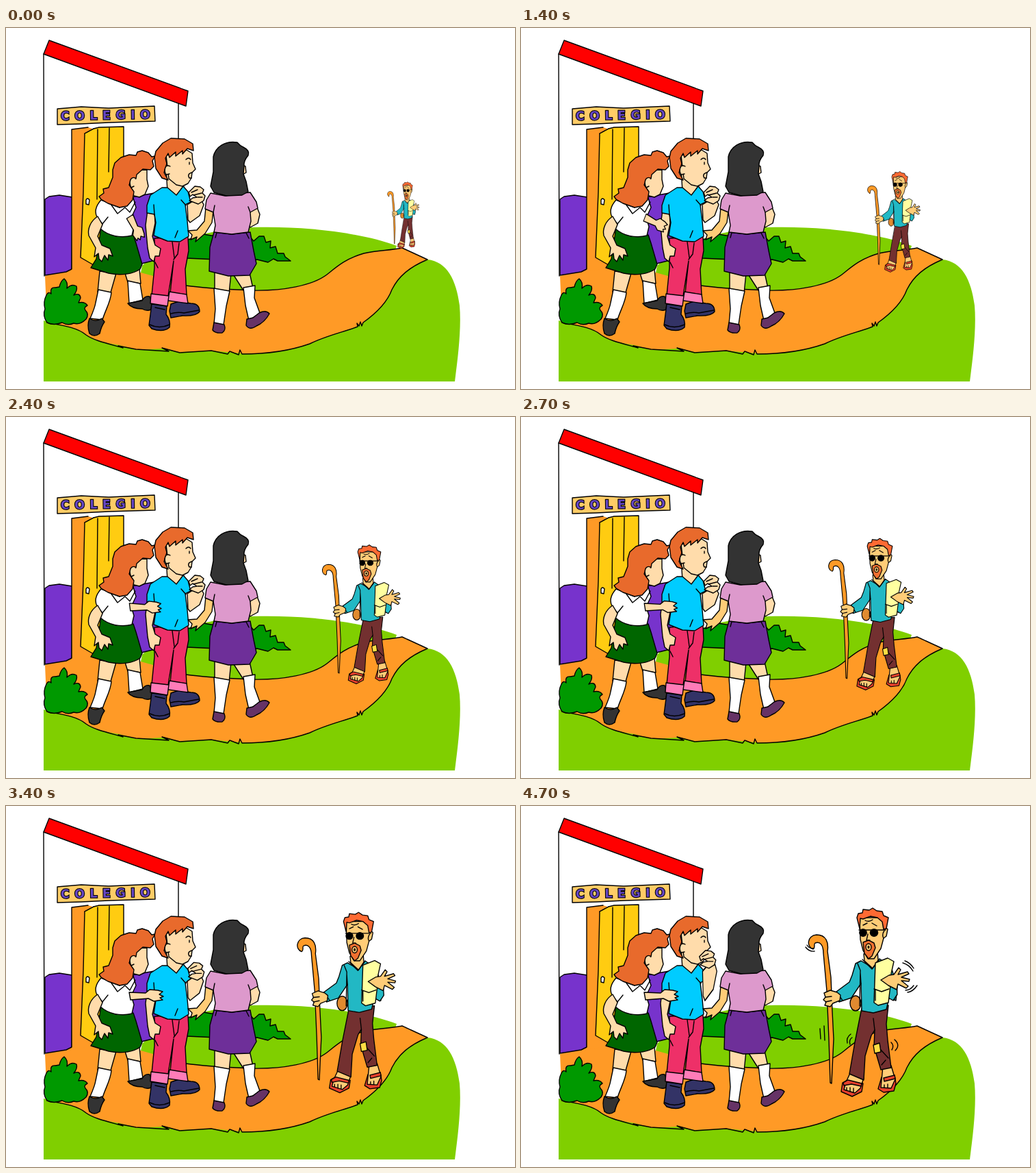
An HTML page for the animation above (4.8 s loop, 744 by 527 pixels).

```html
<!DOCTYPE html>
<html lang="es">
<head>
<meta charset="utf-8">
<title>Colegio</title>
<style>
@property --x { syntax: "<length>"; inherits: false; initial-value: 0px; }
@property --y { syntax: "<length>"; inherits: false; initial-value: 0px; }
@property --sx { syntax: "<number>"; inherits: false; initial-value: 1; }
@property --sy { syntax: "<number>"; inherits: false; initial-value: 1; }
@property --turn { syntax: "<angle>"; inherits: false; initial-value: 0deg; }
@property --lean { syntax: "<number>"; inherits: false; initial-value: 0; }

html, body { margin: 0; width: 100%; height: 100%; overflow: hidden; background: #fff; }
svg { display: block; width: 744px; height: 527px; }
path, ellipse { stroke: #000; stroke-width: 1.4; stroke-linejoin: round; stroke-linecap: round; }
.flat { stroke: none; }
.line { fill: none; }
.skin { fill: #ffdcab; }
.tan { fill: #ffcc77; }
.white { fill: #fff; }
.orange { fill: #ff9a26; }
.yellow { fill: #ffcc11; }
.violet { fill: #7733cc; }
.grass { fill: #80cf00; }
.bush { fill: #009900; }
.red { fill: #e8402c; }
.ginger { fill: #e86a2c; }
.teal { fill: #22b8c4; }
.brown { fill: #733030; }
text { font: bold 17.5px "DejaVu Sans", sans-serif; letter-spacing: 7.4px; fill: #6647c4; stroke: #000; stroke-width: 2.2; paint-order: stroke; }

/* Every 600 ms span is shown as six held poses. */
.man, .reach, .hand, .forearm {
  transform: translate(var(--x), var(--y)) rotate(var(--turn)) scale(var(--sx), var(--sy));
  animation: 4.8s steps(6, end) infinite;
}
.man { animation-name: walk; transform-origin: 514px 424px; }
.reach { animation-name: reach; transform-origin: 183px 276px; }
.hand { animation-name: hand; }
.forearm { animation-name: forearm; transform-origin: 268px 284px; }
.lean {
  transform: translate(calc(var(--lean) * var(--dx)), calc(var(--lean) * 2px));
  animation: lean 4.8s steps(6, end) infinite;
}
.shake { animation: shake 4.8s step-end infinite; }

@keyframes walk {
  0% { --x: 73px; --y: -102px; --sx: .315; --sy: .354; }
  12.5% { --x: 59px; --y: -92px; --sx: .355; --sy: .406; }
  25% { --x: 44px; --y: -76px; --sx: .45; --sy: .489; }
  37.5% { --x: 31px; --y: -53px; --sx: .61; --sy: .616; }
  50% { --x: 17px; --y: -36px; --sx: .732; --sy: .732; }
  62.5% { --x: 4px; --y: -18px; --sx: .866; --sy: .866; }
  75%, 100% { --x: 0px; --y: 0px; --sx: 1; --sy: 1; }
}
@keyframes lean {
  0%, 12.5%, 75%, 100% { --lean: 0; }
  37.5%, 62.5% { --lean: 1; }
}
@keyframes reach {
  0% { --turn: 65deg; --sx: .76; }
  12.5% { --turn: 55deg; --sx: .66; }
  25% { --turn: 38deg; --sx: .68; }
  37.5% { --turn: 10deg; --sx: .78; }
  50% { --turn: 2deg; --sx: .94; }
  62.5%, 100% { --turn: 0deg; --sx: 1; }
}
@keyframes hand {
  0%, 62.5% { --x: 0px; --y: 0px; }
  75% { --x: -2px; --y: -4px; }
  87.5% { --x: -5px; --y: -11px; }
  100% { --x: -6.5px; --y: -22px; }
}
@keyframes forearm {
  0%, 62.5% { --sx: 1; --sy: 1; }
  75% { --sx: .97; --sy: 1.13; }
  87.5% { --sx: .92; --sy: 1.36; }
  100% { --sx: .86; --sy: 1.7; }
}
@keyframes shake {
  0% { opacity: 0; }
  75%, 100% { opacity: 1; }
}
</style>
</head>
<body>
<svg viewBox="0 0 744 527">
  <!-- ground -->
  <path class="grass flat" d="M196 362L199 347C228 318 280 298 340 292C420 287 515 297 571 318L560 350L430 400L200 390Z"/>
  <path class="grass flat" d="M55 427L110 440L300 460L500 400L560 350L616 338C645 341 658 368 663 405C666 440 660 485 656 516H55Z"/>
  <path class="bush" d="M262 310L274 307L283 300L300 303L355 303L362 311L370 304L377 304L380 313L387 311L386 321L394 319L397 329L406 329L408 334L416 340L397 340L391 337L383 342L367 338L350 340L264 336Z" stroke-width=".6"/>
  <path class="orange flat" d="M57 362L96 352L130 342L197 357C225 364 240 372 263 376C300 381 320 381 360 383C405 384 448 376 469 360C484 348 496 337 523 329C545 324 560 325 579 321L616 338C590 349 574 362 564 382C556 404 536 420 517 434C493 444 468 449 444 461C410 473 372 476 345 475L300 471L254 473L228 468L190 470L166 463C146 460 128 456 117 448C104 437 82 434 60 430Z"/>
  <path class="line" d="M263 376C300 381 320 381 360 383C405 384 448 376 469 360C484 348 496 337 523 329C545 324 560 325 579 321L616 338C590 349 574 362 564 382C556 404 536 420 522 430L520 435L518 429L516 435L513 431L514 436C493 444 468 449 444 461C410 473 372 476 345 476L342 470L340 477L327 472L324 476L300 471L254 474L228 467L238 472L190 469L164 464L171 467C146 460 128 456 117 448C104 437 82 434 60 430"/>

  <!-- school -->
  <path class="line" d="M55 38L56 362M252 109V166"/>
  <path class="violet" d="M57 250L63 246L78 244L97 247L96 352L88 356L57 361Z"/>
  <path class="violet" d="M172 249L222 240L222 338L198 344L172 330Z"/>
  <path class="orange flat" d="M96 148L120 145L130 148V350L96 356Z"/>
  <path class="line" d="M96 352V148L120 145"/>
  <path class="yellow" d="M115 154L128 147L136 145L172 144V330L128 346L109 335L113 240Z"/>
  <path class="line" d="M134 148L133 250M151 146L150 210M115 154L128 147"/>
  <path class="white" d="M117 251Q119 247 122 251L121 258L117 257Z" stroke-width="1"/>
  <path fill="#f00" d="M63 18L266 92L263 114L55 38Z"/>
  <path fill="#ffcc66" d="M75 118L110 115L150 117L217 114L218 136L150 138L110 140L75 141Z"/>
  <text x="80" y="134.5" transform="rotate(-1 80 134)">COLEGIO</text>
  <path class="bush" d="M60 430Q53 420 57 410Q54 400 59 390Q62 384 66 388Q64 378 72 379L78 378Q80 369 85 366Q91 371 89 380Q96 373 103 377Q105 383 99 390Q108 386 109 394L106 401Q115 399 119 405Q113 408 116 412Q122 418 117 425Q108 434 99 431Q90 435 82 430Q70 435 60 430Z"/>

  <!-- girl with red hair -->
  <path class="skin" d="M137 355L161 358L153 386L134 385Z"/>
  <path class="white" d="M135 382L154 386C153 400 145 412 141 426L123 424Q130 408 131 401Z"/>
  <path fill="#333" d="M122 424Q131 430 140 424L144 429Q139 436 137 446Q129 452 122 446Q118 434 122 424Z"/>
  <path class="skin" d="M173 355L195 352L197 373L178 371Z"/>
  <path class="white" d="M178 369L196 373L200 397L180 402Z"/>
  <path fill="#333" d="M178 402L199 398Q203 390 210 392Q214 400 212 411Q206 414 199 410Q184 410 178 402Z"/>
  <path fill="#006600" d="M139 291L160 304L186 302L190 314L199 345L196 352C186 359 168 362 150 358L124 350L132 337Z"/>
  <path class="white" d="M139 251C131 260 129 268 133 276L141 286L138 293C150 304 168 307 184 303L187 290L183 277L190 262L186 248L166 262Z"/>
  <path class="line" d="M153 257L163 271L174 262L181 269L189 254M141 286L149 276"/>
  <path class="skin" d="M134 275C123 282 119 294 121 303L131 321L129 334L135 329L136 337L140 341L144 332L149 339L150 331L156 333L152 322L140 317L134 304L141 287Z"/>
  <path class="skin" d="M183 208L206 207L206 221L208 231L203 243L195 247L187 245L182 232Z"/>
  <path class="ginger" d="M156 207L159 197L168 189L180 185L190 186L192 181L199 179L208 182L213 188L218 187L214 194L216 202L211 207L200 206L191 214L190 220L183 221L180 229L187 239L185 251L177 260L166 262L149 256L139 250L136 246L143 241L142 235L150 233L156 218Z"/>
  <path class="skin" d="M189 219C182 216 179 225 183 233L187 231"/>

  <!-- boy -->
  <path class="skin" d="M234 207L236 238L249 246L261 235L258 226Z"/>
  <path class="skin" d="M234 186L264 178L272 183L273 197L277 206L272 211L271 219L266 227L258 231L249 229L238 220Z"/>
  <path class="ginger" d="M217 189L219 180L229 168L241 161L261 162L273 169L274 179L265 176L258 184L258 179L248 187L248 181L239 189L237 183L233 190L235 198L231 211L237 222L228 219L219 205Z"/>
  <path class="skin" d="M240 202C233 198 230 207 234 214L239 213"/>
  <path class="line" d="M263 192Q267 188 270 192M268 196V199M272 211Q264 213 268 219L271 219"/>
  <path fill="#333366" d="M213 403L235 406L234 418Q241 427 239 437Q230 445 213 439L209 434Z"/>
  <path fill="#333366" d="M241 403L253 399L270 402Q283 402 283 414Q278 421 258 420L241 423L239 413Z"/>
  <path class="line" d="M210 433Q224 440 239 433M241 417Q250 414 260 416L282 412M218 408L232 411"/>
  <path fill="#ee3068" d="M217 307L266 305L267 325L262 352L264 390L240 387L245 340L237 391L213 390L217 350Z"/>
  <path fill="#ff7cb8" d="M212 388L238 391L236 406L211 402ZM239 385L264 389L266 402L237 398Z"/>
  <path class="line" d="M243 312L246 335M253 314L251 330L245 338M218 342L222 350"/>
  <path class="skin" d="M207 266L204 288L207 321L210 336L216 341L218 333L224 333L226 322L218 317L214 304L218 285L217 268Z"/>
  <path fill="#00ccff" d="M228 233L236 233L249 244L259 231L266 239L270 254L262 258L265 282L267 304L254 312L236 311L216 303L219 284L217 272L206 270L206 259L211 244Z"/>
  <path class="line" d="M216 258L217 273M263 259L256 251M247 306L251 296"/>
  <path class="skin forearm" d="M265 258L273 253L286 252L289 258L283 274L269 284L266 280Z"/>
  <g class="hand">
    <path class="skin" d="M267 240L276 231L284 232L289 236L287 241L291 245L289 252L281 257L268 252L273 248L279 247L273 243L269 246Z"/>
    <path class="line" d="M271 240L280 236M274 244L286 241M280 247L287 247"/>
  </g>
  <path class="skin reach" d="M180 272L204 273L210 268L222 269L229 271L224 275L230 278L225 280L229 283L216 285L208 281L182 283Z"/>

  <!-- girl with dark hair -->
  <path class="skin" d="M305 356L329 358L326 387L305 383ZM331 358L356 357L361 380L347 383Z"/>
  <path class="white" d="M304 380L327 384L322 406L318 433L304 432L306 410ZM347 379L364 376L363 394L371 416L355 427L350 405Z"/>
  <path fill="#663366" d="M304 430L319 433Q322 441 316 445Q306 446 302 441ZM352 425L361 423L370 416Q380 411 385 417Q378 430 366 435Q356 442 351 434Z"/>
  <path class="tan" d="M292 262L303 267L301 284L291 300L277 312L279 305L270 309L272 302L266 296L279 295L290 282Z"/>
  <path class="skin" d="M356 266L367 262L371 272L368 285L357 291L354 286Z"/>
  <path fill="#6e2f99" d="M304 298L330 301L357 298L362 325L366 344L356 361L325 362L297 355L298 320Z"/>
  <path fill="#dd99cc" d="M299 241L320 245L345 241L357 240L366 254L368 263L357 269L358 282L354 298L330 301L304 298L306 288L303 269L291 264L293 251Z"/>
  <path class="line" d="M303 269L305 259M357 269L354 261M308 299L306 306M351 299L355 307"/>
  <path class="skin" d="M346 200L350 202L351 211L346 214Z"/>
  <path fill="#333" d="M303 188C306 174 320 164 338 167Q342 172 347 174Q357 179 354 186Q347 194 348 202L347 213L351 224L354 239L345 244L322 245L304 240L299 231L303 210Z"/>

  <!-- walking man -->
  <g class="man">
    <g class="lean" style="--dx: 4px">
      <path class="red" d="M470 404L484 396L500 405L498 417L484 424L468 417ZM527 396L546 393L548 405L545 416L530 418L522 413Z"/>
      <path class="tan" d="M482 388L501 397L496 412L488 419L472 414L475 403ZM529 380L541 379L547 399L541 412L526 411Z"/>
      <path class="red" d="M471 404L478 400L498 405L497 409L483 406L472 408ZM530 397L546 393L547 398L531 402Z"/>
      <path class="line" d="M476 411V415M481 411V417M486 412V418M531 407V411M536 406V411"/>
      <path class="brown" d="M498 295L537 291L534 318L536 342L541 382L526 385L516 351L517 327L512 335L503 365L501 400L480 391L488 345Z"/>
      <path class="line" d="M517 327L515 310M526 356L537 368M527 378L533 371"/>
      <path fill="#ffdd44" d="M515 349L524 346L526 359L517 361Z"/>
    </g>
    <ellipse cx="489" cy="288" rx="8" ry="11" fill="#e08a30"/>
    <path class="teal" d="M497 226L489 230L484 247L480 257L461 271L465 286L483 280L497 259L498 299L515 302L534 297L538 280L548 284L550 264L541 235L524 223L514 236Z"/>
    <path class="line" d="M497 259L496 244M464 275L470 284M492 230L496 240L495 292" stroke-width="1.8"/>
    <path class="tan" d="M501 216L502 226L514 237L522 225L521 211Z"/>
    <path class="line" d="M499 224L513 238L523 225" stroke-width="2"/>
    <g class="lean" style="--dx: 8px">
      <path class="teal" d="M536 262L549 259L550 275L544 284L537 280Z"/>
      <path fill="#ffffa0" d="M518 229L536 222L545 227L541 245L540 262L537 287L522 291L516 287Z"/>
      <path class="line" d="M516 267L527 271L538 267M518 268V284"/>
      <path class="tan" d="M526 254L538 247L545 246L552 236L555 239L551 246L565 242L567 245L556 250L568 253L567 256L556 255L566 263L563 266L551 260L549 268L537 262Z"/>
    </g>
    <path class="tan" d="M495 163L530 163L531 175L536 180L534 190L530 193L526 208L516 223L507 223L500 211L496 195Z"/>
    <path fill="#ff6a33" d="M491 163L493 157L499 156L500 151L509 152L514 149L520 153L528 154L530 160L537 163L534 179L530 180L528 169L521 163L511 161L500 165L496 164L495 179Z"/>
    <path fill="#f07030" d="M500 199L508 196L516 200L518 207L513 219L508 223L502 215Z" stroke-width=".8"/>
    <ellipse class="tan" cx="508" cy="206" rx="4" ry="5"/>
    <ellipse cx="508" cy="206" rx=".8" ry="1.6"/>
    <ellipse cx="500" cy="185" rx="5.2" ry="5.2"/>
    <ellipse cx="516" cy="185" rx="5.6" ry="5.2"/>
    <path class="line" d="M494 181L533 181" stroke-width="1.6"/>
    <path class="line" d="M500 174L506 171M513 171L520 175M503 167Q508 170 514 166M507 187L505 196L510 196M531 182Q527 188 530 193"/>
    <path class="orange" d="M427 209C417 206 418 189 432 188C446 188 450 199 448 212L453 250L455 300L457 340L454 405L452 404L450 340L447 270L442 215C442 203 437 197 430 200C427 202 431 206 427 209Z" stroke-width=".8"/>
    <path class="tan" d="M443 273L452 269L462 272L467 276L466 284L456 288L452 293L444 291L446 286L442 283L445 279Z"/>
    <path class="line" d="M445 279L454 278M445 286L454 284"/>
  </g>

  <g class="shake">
    <path class="line" d="M416 206Q421 213 429 212M418 203Q421 208 427 208M558 229Q568 232 573 241M561 226Q569 229 574 237M565 272Q573 271 579 262M562 269Q569 269 574 262M437 325L438 340M443 321L444 342M477 346Q475 338 482 333M481 348Q479 341 484 338M541 345Q546 350 542 356M546 341Q555 349 547 357" stroke-width="1"/>
  </g>
</svg>
</body>
</html>
```
